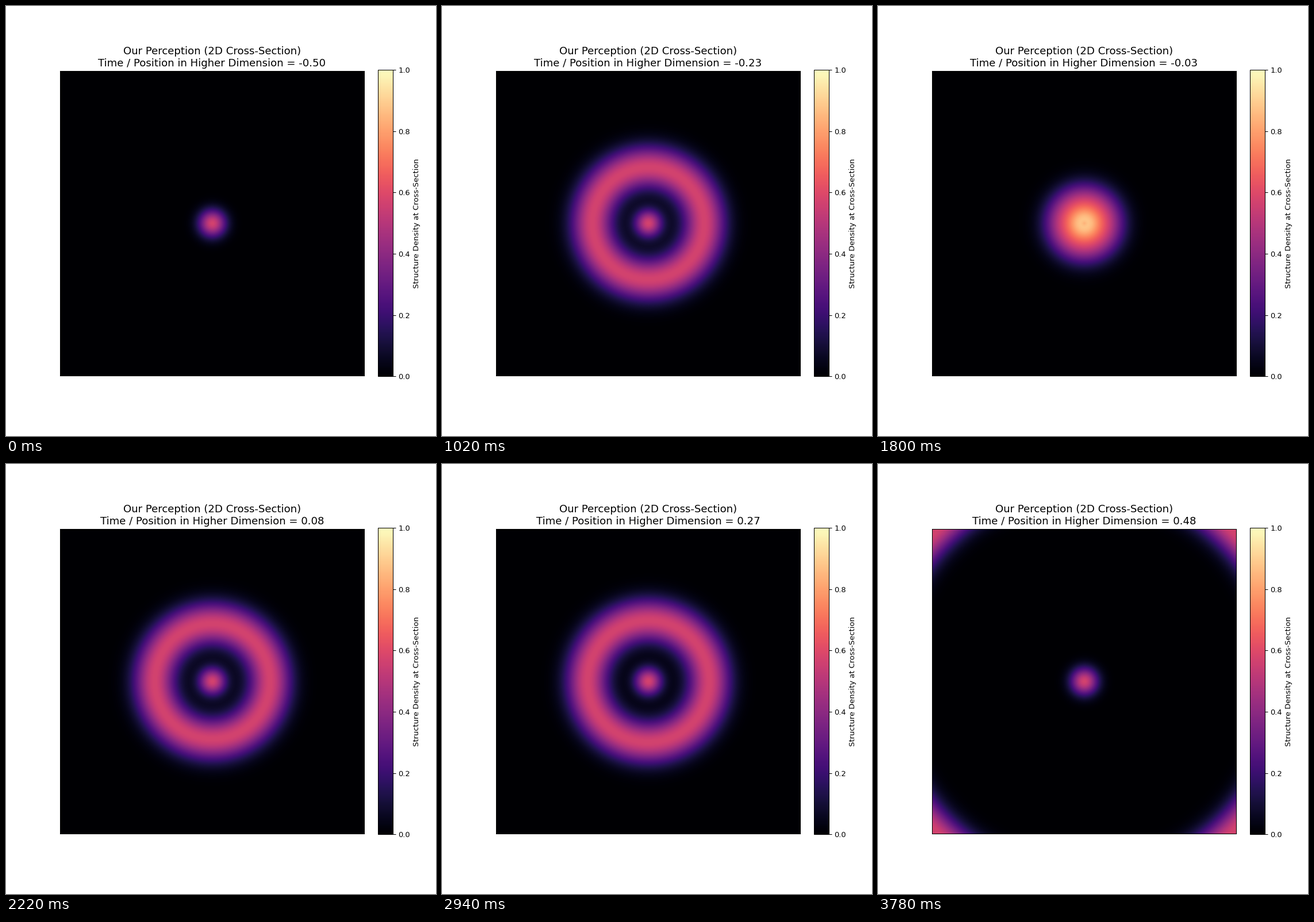
Animation, 748 px wide and 748 px high, one loop 3.84 s. Source, as a matplotlib script:

```python
import numpy as np
import matplotlib.pyplot as plt
from matplotlib.animation import FuncAnimation

FRAMES = 64
INTERVAL = 60
PEAK = 0.57          # density of a single undisturbed layer
CORE_WIDTH = 0.063
SHELL_WIDTH = 0.098

# Shell profile: signed radius along the hidden axis, as a smooth polynomial
KNOT_STEPS = np.array([13, 17, 24, 30, 42, 56, 63])
KNOT_RADII = np.array([-0.885, -0.368, -0.06, -0.122, -0.534, 0.385, 1.395])
profile = np.polynomial.Polynomial.fit(
    KNOT_STEPS / FRAMES - 0.5, KNOT_RADII, len(KNOT_STEPS) - 1)

axis = np.linspace(-1, 1, 400)
X, Y = np.meshgrid(axis, axis)
R = np.hypot(X, Y)


def bell(distance, width):
    return np.exp(-distance**2 / (2 * width**2))


CORE = bell(R, CORE_WIDTH)


def position(step):
    return step / FRAMES - 0.5


def density(w):
    shell = bell(R - abs(profile(w)), SHELL_WIDTH)
    return np.clip(PEAK * (CORE + shell), 0, 1)


def caption(w):
    return ("Our Perception (2D Cross-Section)\n"
            f"Time / Position in Higher Dimension = {w:.2f}")


fig, ax = plt.subplots(figsize=(8, 8), dpi=93.5)
image = ax.imshow(density(position(0)), cmap="magma", vmin=0, vmax=1,
                  extent=(-1, 1, -1, 1), origin="lower",
                  interpolation="bilinear")
ax.set_xticks([])
ax.set_yticks([])
title = ax.set_title(caption(position(0)), fontsize=14)
bar = fig.colorbar(image, ax=ax, fraction=0.046, pad=0.04)
bar.set_label("Structure Density at Cross-Section")


def update(step):
    w = position(step)
    image.set_data(density(w))
    title.set_text(caption(w))
    return image, title


anim = FuncAnimation(fig, update, frames=FRAMES, interval=INTERVAL,
                     repeat=True, repeat_delay=0, blit=False)
plt.show()
```
